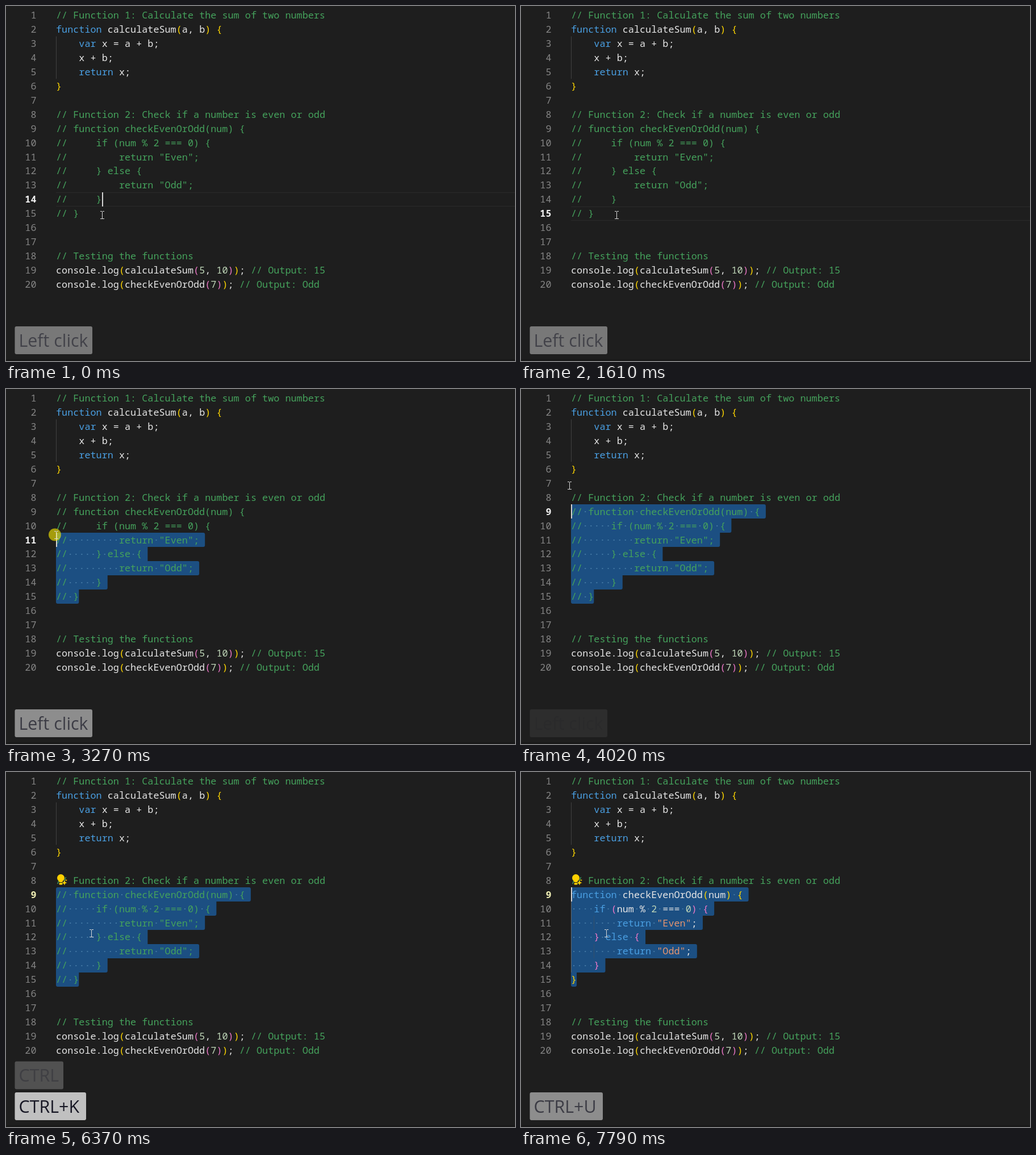
Recreate the animation shown at these times as an HTML page with a canvas. Size 896 by 625 pixels, loop 8 s.

```html
<!DOCTYPE html>
<html lang="en">
<head>
<meta charset="utf-8">
<title>Uncommenting code</title>
<style>
html, body { margin: 0; width: 100%; height: 100%; overflow: hidden; background: #1e1e1e; }
canvas { display: block; }
</style>
</head>
<body>
<canvas id="stage" width="896" height="625"></canvas>
<script>
const ctx = document.getElementById('stage').getContext('2d');
const LOOP = 8000, LEFT = 88, TOP = 3.5, COL = 10.085, ROW = 24.95;
const CODE_FONT = '16.81px "Noto Sans Mono", monospace';
const LABEL_FONT = '30.4px "Open Sans", sans-serif';
const BG = '#1e1e1e', COMMENT = '#45a25c', KEYWORD = '#4a9fe2', PLAIN = '#e6e6e6',
  NUMBER = '#bfd6b8', STRING = '#e5946f', BRACKETS = ['#ffd700', '#ee78c8'];

const PRESS = 560, RELEASE = 900, DRAG = 2240, DROP = 3950, BULB = 4160, UNCOMMENT = 6800;

const plainLines = `// Function 1: Calculate the sum of two numbers
function calculateSum(a, b) {
    var x = a + b;
    x + b;
    return x;
}

// Function 2: Check if a number is even or odd
function checkEvenOrOdd(num) {
    if (num % 2 === 0) {
        return "Even";
    } else {
        return "Odd";
    }
}


// Testing the functions
console.log(calculateSum(5, 10)); // Output: 15
console.log(checkEvenOrOdd(7)); // Output: Odd`.split('\n');
const commentedLines = plainLines.map((s, i) => i >= 8 && i <= 14 ? '// ' + s : s);

const rowTop = line => TOP + (line - 1) * ROW;
const colX = col => LEFT + col * COL;

// Split lines into coloured words; brackets alternate colour by depth.
function tokenize(lines) {
  const rule = /\/\/.*|"[^"]*"|\b(?:function|var|return|if|else)\b|\d+|[(){}]|[A-Za-z]\w*|[^\s\w(){}"]/g;
  let depth = 0;
  const colour = word => {
    if (word.startsWith('//')) return COMMENT;
    if (word[0] === '"') return STRING;
    if (/^(function|var|return|if|else)$/.test(word)) return KEYWORD;
    if (/^\d/.test(word)) return NUMBER;
    if (/[({]/.test(word)) return BRACKETS[depth++ % 2];
    if (/[)}]/.test(word)) return BRACKETS[--depth % 2];
    return PLAIN;
  };
  return lines.map(line => [...line.matchAll(rule)].flatMap(m => {
    const fill = colour(m[0]);
    return [...m[0].matchAll(/\S+/g)].map(w => ({ text: w[0], col: m.index + w.index, fill }));
  }));
}
const commented = { lines: commentedLines, tokens: tokenize(commentedLines) };
const uncommented = { lines: plainLines, tokens: tokenize(plainLines) };

// Pointer path: time, x, y
const path = [
  [0, 169, 367.5], [1200, 168, 367.5], [2040, 168, 367.5], [2240, 137, 356],
  [2400, 137, 356], [2600, 125, 341], [2800, 117, 324], [3270, 88, 257.5],
  [3620, 77, 227], [3750, 77, 226], [3950, 77, 226], [4180, 104, 46],
  [4510, 150, 284], [8000, 150, 284]
];
function pointerAt(t) {
  const i = path.findIndex(p => p[0] > t);
  const [t0, x0, y0] = path[i - 1], [t1, x1, y1] = path[i];
  const k = (t - t0) / (t1 - t0);
  return { x: x0 + (x1 - x0) * k, y: y0 + (y1 - y0) * k };
}

const caretOff = [[1110, 1640], [2130, 2240], [4210, 4720], [5180, 5710], [6240, 6700], [7320, 7770]];

function caretAt(t, lines) {
  if (t < PRESS) return { line: 14, col: 8 };
  if (t < DRAG) return { line: 15, col: 4 };
  const p = pointerAt(Math.min(t, DROP));
  const line = Math.floor((p.y - TOP) / ROW) + 1;
  const col = Math.round((p.x - LEFT) / COL);
  return { line, col: Math.max(0, Math.min(col, lines[line - 1].length)) };
}

function drawSelection(lines, caret) {
  const end = lines[14].length;
  const span = n => n < caret.line || n > 15 ? null :
    [n === caret.line ? caret.col : 0, n === 15 ? end : lines[n - 1].length + 1];
  for (let n = caret.line; n <= 15; n++) {
    const [a, b] = span(n), above = span(n - 1), below = span(n + 1), r = 3;
    const y = Math.round(rowTop(n)), h = Math.round(rowTop(n + 1)) - y;
    ctx.fillStyle = '#1c4f82';
    ctx.beginPath();
    ctx.roundRect(colX(a), y, (b - a) * COL, h, [
      !above || above[0] > a ? r : 0, !above || above[1] < b ? r : 0,
      !below || below[1] < b ? r : 0, below ? 0 : r]);
    ctx.fill();
    ctx.fillStyle = '#4378a4';
    for (let c = a; c < Math.min(b, lines[n - 1].length); c++) {
      if (lines[n - 1][c] === ' ') ctx.fillRect(colX(c + 0.5) - 1, y + 12, 2, 2);
    }
  }
}

function drawGuide(col, from, to, fill) {
  ctx.fillStyle = fill;
  ctx.fillRect(Math.round(colX(col)), rowTop(from), 1, (to - from + 1) * ROW);
}

function drawCode({ tokens }, caret, bulb) {
  ctx.textBaseline = 'alphabetic';
  tokens.forEach((words, i) => {
    const y = rowTop(i + 1) + 18.5, active = i + 1 === caret.line;
    ctx.textAlign = 'right';
    ctx.font = (active ? 'bold ' : '') + CODE_FONT;
    ctx.fillStyle = active ? (bulb ? '#efeeb4' : '#f0f0f0') : '#858585';
    ctx.fillText(i + 1, 53.5, y);
    ctx.textAlign = 'left';
    ctx.font = CODE_FONT;
    for (const w of words) {
      ctx.fillStyle = w.fill;
      ctx.fillText(w.text, colX(w.col), y);
    }
  });
}

function drawBulb() {
  ctx.fillStyle = '#ffd000';
  ctx.beginPath();
  ctx.arc(96.5, 186.5, 6.5, 0, Math.PI * 2);
  ctx.fill();
  ctx.fillRect(93.5, 191, 6, 3);
  ctx.beginPath();
  ctx.roundRect(93.5, 195, 6, 3.5, 1.5);
  ctx.fill();
  for (const [x, y, r] of [[103, 195, 4.5], [106, 190.5, 2]]) {
    ctx.beginPath();
    for (let i = 0; i < 8; i++) {
      const d = i % 2 ? r * 0.4 : r, a = i * Math.PI / 4;
      ctx.lineTo(x + d * Math.cos(a), y + d * Math.sin(a));
    }
    ctx.fill();
  }
}

function drawPointer({ x, y }, pressed) {
  if (pressed) {
    ctx.fillStyle = 'rgba(255,240,0,.6)';
    ctx.beginPath();
    ctx.arc(x - 2, y - 1, 11, 0, Math.PI * 2);
    ctx.fill();
  }
  x = Math.round(x);
  y = Math.round(y);
  ctx.fillStyle = '#d8d8d8';
  ctx.fillRect(x, y - 6, 1, 13);
  for (const edge of [y - 7, y + 6]) {
    ctx.fillRect(x - 3, edge, 3, 1);
    ctx.fillRect(x + 1, edge, 3, 1);
  }
}

function drawLabel(text, width, alpha, y = 564) {
  if (alpha <= 0) return;
  ctx.globalAlpha = Math.min(1, alpha);
  ctx.fillStyle = '#c0c0c0';
  ctx.beginPath();
  ctx.roundRect(15.5, y, width, 49, 3);
  ctx.fill();
  ctx.fillStyle = '#171724';
  ctx.font = LABEL_FONT;
  ctx.fillText(text, 22.5, y + 35.5);
  ctx.globalAlpha = 1;
}

function drawLabels(t) {
  const fade = start => 1 - (t - start) / 450;
  const click = a => drawLabel('Left click', 136.5, a);
  if (t < PRESS) click(Math.max(0.08, fade(-198)));
  else if (t < DRAG) click(Math.max(0.08, fade(1412)));
  else if (t < 5710) click(Math.max(t < 4990 ? 0.09 : 0.065, fade(3130)));
  else if (t < 6040) drawLabel('CTRL', 85.5, 0.5 + (t - 5710) / 140);
  else if (t < 6760) {
    drawLabel('CTRL', 85.5, fade(6060), 509.5);
    drawLabel('CTRL+K', 125.5, 1);
  } else {
    drawLabel('CTRL+K', 125.5, fade(6760), 509.5);
    drawLabel('CTRL+U', 128.5, Math.max(0.69, fade(7650)));
  }
}

function draw(t) {
  const doc = t < UNCOMMENT ? commented : uncommented;
  const caret = caretAt(t, doc.lines);
  const selecting = t >= DRAG && (caret.line < 15 || caret.col < doc.lines[14].length);
  const bulb = t >= BULB;

  ctx.fillStyle = BG;
  ctx.fillRect(0, 0, 896, 625);
  ctx.fillStyle = '#191919';
  ctx.fillRect(0, 622, 896, 3);

  if (selecting) drawSelection(doc.lines, caret);
  else {
    ctx.fillStyle = '#2a2a2a';
    ctx.fillRect(LEFT, Math.round(rowTop(caret.line)), 808, 1);
    ctx.fillRect(LEFT, Math.round(rowTop(caret.line + 1)) - 1, 808, 1);
  }
  drawGuide(0, 3, 5, '#404040');
  if (doc === uncommented) {
    drawGuide(0, 10, 14, '#5c6670');
    drawGuide(4, 11, 11, '#34506a');
    drawGuide(4, 13, 13, '#34506a');
  }
  drawCode(doc, caret, bulb);
  if (bulb) drawBulb();
  if (!caretOff.some(([a, b]) => t >= a && t < b)) {
    ctx.fillStyle = '#d4d4d4';
    ctx.fillRect(Math.round(colX(caret.col)), Math.round(rowTop(caret.line)), 2, 25);
  }
  drawLabels(t);
  const pressed = (t >= PRESS && t < RELEASE) || (t >= DRAG && t < DROP);
  drawPointer(pointerAt(t), pressed);
}

function tick() {
  draw(performance.now() % LOOP);
  requestAnimationFrame(tick);
}
tick();
</script>
</body>
</html>
```
